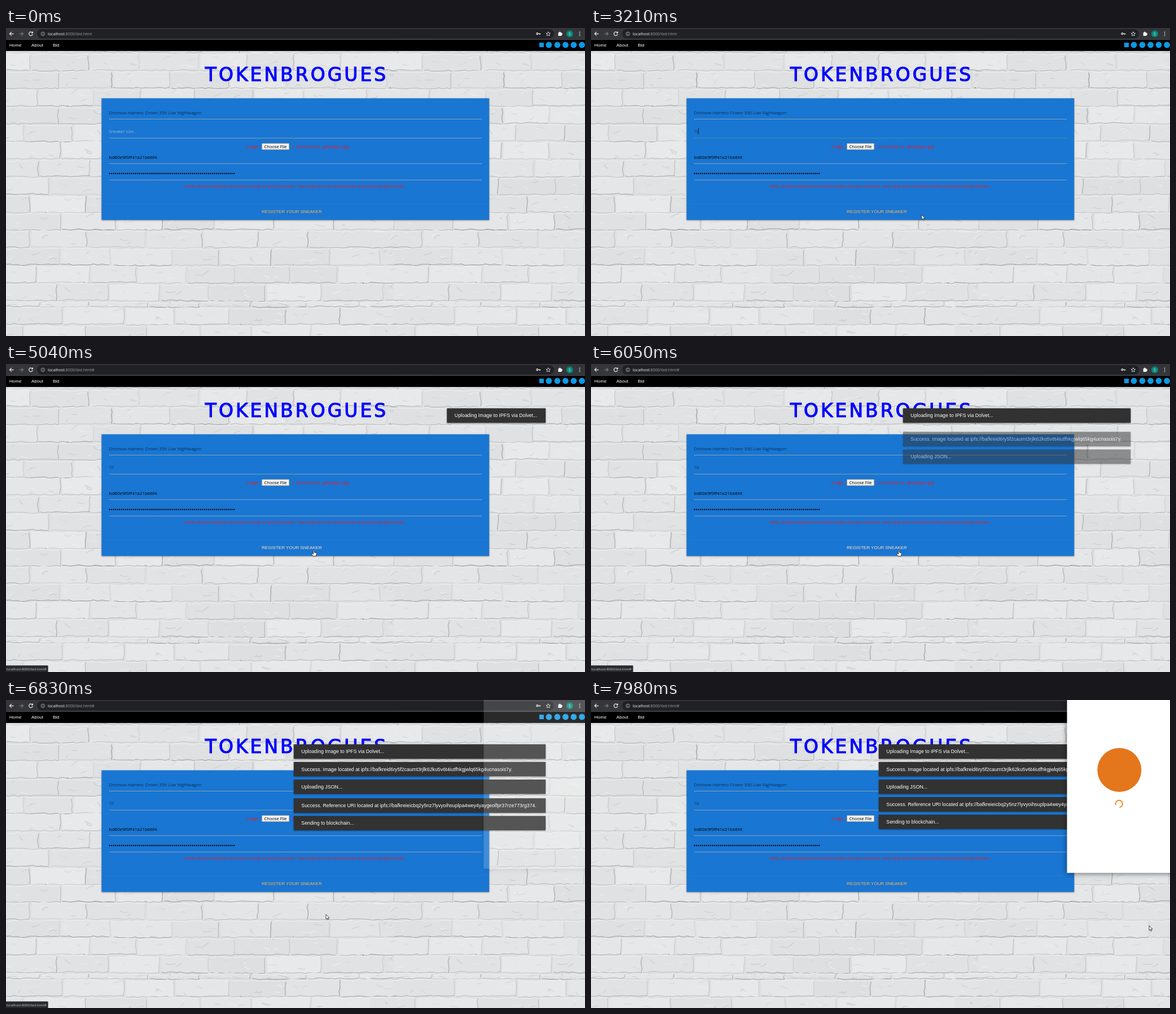
An HTML page for the animation above (8 s loop, 1026 by 546 pixels).

```html
<!DOCTYPE html>
<html lang="en">
<head>
<meta charset="utf-8">
<title>Sneaker registration</title>
<style>
  html, body { margin: 0; width: 100%; height: 100%; overflow: hidden; background: #dcdedf; }
  svg { display: block; width: 100vw; height: 100vh; }
  text { white-space: pre; }
  .page { font-family: "Open Sans", "Noto Sans", sans-serif; }
  .ui { font-family: "Liberation Sans", Arial, sans-serif; }
  .title { font-family: "DejaVu Sans", sans-serif; letter-spacing: 4px; }
  .raised { filter: drop-shadow(0 1px 1.2px rgba(0, 0, 0, .4)); }
  .window { filter: drop-shadow(0 1px 5px rgba(0, 0, 0, .55)); }
</style>
</head>
<body>
<svg id="stage" viewBox="0 0 1026 546" preserveAspectRatio="none"></svg>
<script>
const LOOP = 8000;
const stage = document.getElementById('stage');

function add(parent, tag, attrs = {}, content) {
  const el = document.createElementNS('http://www.w3.org/2000/svg', tag);
  set(el, attrs);
  if (content !== undefined) el.textContent = content;
  parent.appendChild(el);
  return el;
}
function set(el, attrs) {
  for (const key in attrs) el.setAttribute(key, attrs[key]);
}
const rect = (p, x, y, width, height, fill, more) => add(p, 'rect', { x, y, width, height, fill, ...more });
const circle = (p, cx, cy, r, fill, more) => add(p, 'circle', { cx, cy, r, fill, ...more });
const path = (p, d, more) => add(p, 'path', { d, fill: 'none', ...more });
const label = (p, x, y, str, size, fill, more) =>
  add(p, 'text', { x, y, 'font-size': size, fill, class: 'page', ...more }, str);
const show = (el, on) => el.setAttribute('visibility', on ? 'visible' : 'hidden');

const clamp = v => Math.max(0, Math.min(1, v));
const ramp = (t, from, to) => clamp((t - from) / (to - from));
const lerp = (a, b, p) => a + (b - a) * p;
const easeOut = p => 1 - (1 - p) ** 3;
const mix = (a, b, p) => `rgb(${a.map((v, i) => Math.round(lerp(v, b[i], p)))})`;

// Seeded random numbers for the wall
let seed = 41;
function rnd(lo = 0, hi = 1) {
  seed = (seed * 16807) % 2147483647;
  return lo + (hi - lo) * seed / 2147483647;
}

function jagged(x1, y1, x2, y2, wobble) {
  const n = Math.max(2, Math.round(Math.hypot(x2 - x1, y2 - y1) / 7));
  let d = '';
  for (let i = 0; i <= n; i++) {
    const x = lerp(x1, x2, i / n) + rnd(-wobble, wobble);
    const y = lerp(y1, y2, i / n) + rnd(-wobble, wobble);
    d += `${i ? 'L' : ''}${x.toFixed(1)} ${y.toFixed(1)} `;
  }
  return d;
}

function brick(p, x, y, w, h) {
  const g = Math.round(rnd(221, 231));
  const right = x + w - 3, bottom = y + h - 3;
  const top = jagged(x, y, right, y, 1.3);
  const side = jagged(right, y + 1, right, bottom, 1.3);
  const under = jagged(right, bottom, x, bottom, 1.3);
  const shadow = () => ({ stroke: '#96999b', 'stroke-width': rnd(.4, 1.4), opacity: rnd(.35, .9) });
  path(p, `M${top}L${side}L${under}Z`, { fill: `rgb(${g},${g + 2},${g + 3})` });
  path(p, `M${side}`, shadow());
  path(p, `M${under}`, shadow());
  path(p, `M${top}`, { stroke: '#f1f2f2', 'stroke-width': 1 });
  for (let i = 0; i < 4; i++) {
    const sx = rnd(x + 4, right - 14), sy = rnd(y + 4, bottom - 4);
    path(p, 'M' + jagged(sx, sy, sx + rnd(4, 16), sy + rnd(-6, 6), 1.8),
      { stroke: i % 2 ? '#eff0f1' : '#c6c9cb', 'stroke-width': rnd(.5, 1.5), opacity: .75 });
  }
  if (rnd() < .25) circle(p, rnd(x, right), bottom, rnd(.4, .9), '#77797b');
}

function buildWall() {
  const tile = add(stage, 'g', { id: 'tile' });
  rect(tile, 0, 40, 695, 506, '#dddfe0');
  let y = 15, row = 0;
  while (y < 546) {
    const h = row === 15 ? 11 : 31.4;
    let x = row % 2 ? -50 : -8;
    while (x < 695) {
      const w = Math.min(rnd(82, 112), 698 - x);
      if (w > 12) brick(tile, x, y + rnd(-1, 1), w, h);
      x += w;
    }
    y += h;
    row++;
  }
  add(stage, 'use', { href: '#tile', x: 695 });
}

function buildBrowser() {
  rect(stage, 0, 0, 1026, 20.5, '#35363a');
  rect(stage, 55, 2, 916, 16.5, '#202124', { rx: 8.2 });
  const pen = { stroke: '#e8eaed', 'stroke-width': 1.2 };
  path(stage, 'M13.5 10.3H6.5M9.8 7L6.5 10.3L9.8 13.6', pen);
  path(stage, 'M23.5 10.3H30.5M27.2 7L30.5 10.3L27.2 13.6', { ...pen, stroke: '#76787b' });
  path(stage, 'M46.6 8.2A3.3 3.3 0 1 0 47.2 11M47.4 6.3V9H44.7', pen);
  circle(stage, 65.3, 10.3, 3.2, 'none', { stroke: '#c4c7ca', 'stroke-width': .8 });
  path(stage, 'M65.3 9.8V12M65.3 8.3V9.1', { stroke: '#c4c7ca', 'stroke-width': .8 });
  const url = label(stage, 74, 12.8, '', 7.1, '#9aa0a6');
  add(url, 'tspan', { fill: '#f1f3f4' }, 'localhost');
  add(url, 'tspan', {}, ':8000/bid.html');
  const hash = add(url, 'tspan', {}, '');

  circle(stage, 941.4, 10.2, 1.5, 'none', pen);
  path(stage, 'M943 10.2H947.3M945.8 10.2V12', pen);
  const star = Array.from({ length: 10 }, (_, i) => {
    const r = i % 2 ? 1.8 : 4, a = i * Math.PI / 5;
    return `${960.8 + r * Math.sin(a)},${10.6 - r * Math.cos(a)}`;
  });
  add(stage, 'polygon', { points: star.join(' '), fill: 'none', stroke: '#dfe1e5', 'stroke-width': .9 });
  rect(stage, 978.6, 8, 6, 6, '#f1f3f4', { rx: .6 });
  circle(stage, 981.4, 7.9, 1.3, '#f1f3f4');
  circle(stage, 984.8, 10.8, 1.3, '#f1f3f4');
  circle(stage, 999, 10.2, 6, '#00897b');
  label(stage, 999, 12.8, 'S', 7, '#fff', { 'text-anchor': 'middle' });
  for (const y of [7.3, 10.3, 13.3]) circle(stage, 1016.5, y, .9, '#e8eaed');
  return hash;
}

function buildPage() {
  rect(stage, 0, 20.5, 1026, 20.3, '#000');
  [['Home', 6], ['About', 45], ['Bid', 83]].forEach(([s, x]) =>
    label(stage, x, 33.2, s, 8, '#fff', { class: 'ui' }));
  rect(stage, 945, 26, 8, 8, '#0d99e6');
  for (const x of [962, 977, 991.5, 1006, 1020.5]) circle(stage, x, 30, 5.4, '#0d99e6');
  label(stage, 515, 94, 'TOKENBROGUES', 33, '#00f',
    { class: 'title', 'text-anchor': 'middle', stroke: '#00f', 'stroke-width': 1.1 });

  rect(stage, 169.4, 124.6, 686.8, 215.6, '#1976d2', { class: 'raised' });
  const lines = [161.5, 195.2, 240.5, 269.5].map(y =>
    path(stage, `M182.5 ${y}H843.5`, { stroke: '#91a5ba', 'stroke-width': .9 }));
  const light = { 'font-weight': 300 };
  label(stage, 182.5, 152.8, 'Dromow Hammo Crown 350 Low Nightwagon', 8, '#020b14', light);
  const hint = label(stage, 182.5, 186.1, 'Sneaker size...', 7.8, '#d1d9e1', light);
  const size = label(stage, 182.5, 186.1, '', 7.4, '#020b14', light);
  const caret = rect(stage, 182.3, 177.3, .8, 11.2, '#06121f');

  const red = '#ff1020';
  label(stage, 426, 213.2, 'Image:', 7.4, red);
  rect(stage, 453.3, 204.4, 48.6, 11.4, '#efefef', { stroke: '#767676', 'stroke-width': .7, rx: .8 });
  label(stage, 477.6, 212.9, 'Choose File', 7.5, '#000', { 'text-anchor': 'middle' });
  label(stage, 506, 213.2, '1. Dromow Ha...ghtwagon.jpg', 7.4, red);
  label(stage, 182.5, 231.6, 'bd60e9f0ff41e21bb6f4', 8, '#000');
  path(stage, 'M183.6 258H404.6', { stroke: '#000', 'stroke-width': 2.3,
    'stroke-linecap': 'round', 'stroke-dasharray': '0 3.5' });
  label(stage, 512, 282.8, 'Note: Dolvet requests are done locally via your browser. ' +
    'Your keys are not shared with any party except Dolvet.', 7.6, red, { 'text-anchor': 'middle' });
  path(stage, 'M169.5 311H856.5', { stroke: '#a0a0a0', 'stroke-width': .6, opacity: .2 });
  const register = label(stage, 453, 328.1, 'REGISTER YOUR SNEAKER', 8.02, '#ffab40', { class: 'ui' });

  const status = add(stage, 'g');
  rect(status, -1, 534.5, 75.5, 13, '#292a2d', { stroke: '#5f6368', 'stroke-width': .7, rx: 1 });
  label(status, .8, 542.8, 'localhost:8000/bid.html#', 6.1, '#c8cbcf');
  return { line: lines[1], hint, size, caret, register, status };
}

const TOASTS = [
  [4760, 'Uploading Image to IPFS via Dolvet...'],
  [5998, 'Success. Image located at ipfs://bafkreid6ry5f2caumt3rjlk62ku5v6t4iutfhkgjwlq65kg4ucnasois7y.'],
  [5998, 'Uploading JSON...'],
  [6677, 'Success. Reference URI located at ipfs://bafkreieicbq2y5nz7lyvyoihsuplpa4wey4yaygeolfpr37rze773rg374.'],
  [6677, 'Sending to blockchain...']
];

function buildToasts() {
  return TOASTS.map(([start, str], i) => {
    const g = add(stage, 'g');
    const box = rect(g, 0, 0, 10, 25.6, '#323232', { class: 'raised', rx: .8 });
    label(g, 13.5, 15.9, str, 8.8, '#fff', { class: 'ui' });
    return { start, g, box, y: 78.6 + i * 31.15 };
  });
}

function buildWallet() {
  const g = add(stage, 'g', { class: 'window' });
  const box = rect(g, 843.5, -10, 190, 316.5, '#fff');
  const badge = circle(g, 936.3, 124, 39, '#e4761b');
  const spinner = circle(g, 935.8, 184, 6.2, 'none', {
    stroke: '#f6851b', 'stroke-width': 1.9, 'stroke-dasharray': '30 9' });
  return { g, box, badge, spinner };
}

function buildPointers() {
  const ink = { fill: '#fff', stroke: '#000', 'stroke-width': .7, 'stroke-linejoin': 'round' };
  return {
    arrow: path(stage, 'M0 0V8.6L2 6.8L3.3 9.8L4.6 9.2L3.3 6.3H6Z', ink),
    beam: path(stage, 'M-2 -5.5H2M0 -5.5V5.5M-2 5.5H2', { stroke: '#4b5a62', 'stroke-width': .8 }),
    hand: path(stage, 'M-.9 -.5Q0 -2 .9 -.5V3L4 3.8Q5 4.2 4.8 5.5L4 9.6H-1.6L-4 6Q-4.3 4.6 -3 4.8L-.9 6.2Z', ink)
  };
}

buildWall();
const hash = buildBrowser();
const page = buildPage();
const toasts = buildToasts();
const wallet = buildWallet();
const pointers = buildPointers();

// Moments at which the screen refreshes: first, last, count
const BEATS = [
  [230, 1000, 11], [1070, 1280, 4], [1540, 1540, 1], [1900, 1990, 2], [2570, 2650, 2],
  [2880, 3660, 11], [3840, 4160, 5], [4570, 4640, 2], [4810, 5040, 4], [6050, 6280, 4],
  [6600, 7360, 11], [7470, 7980, 8]
];
function refreshTime(t) {
  let last = 0;
  for (const [a, b, n] of BEATS) {
    for (let i = 0; i < n; i++) {
      const s = Math.round(n > 1 ? lerp(a, b, i / (n - 1)) : a);
      if (s <= t) last = s;
    }
  }
  return last;
}

const ROUTE = [
  [230, 616, 511], [1000, 216, 181], [2650, 218, 181], [2800, 219, 182], [3190, 586, 331],
  [3660, 552, 333], [3840, 548, 332], [4160, 545.5, 331], [6600, 545.5, 331],
  [6828, 567, 380], [7360, 598, 414], [7620, 760, 417], [7980, 989, 400]
];
function pointerAt(t) {
  let i = 0;
  while (i < ROUTE.length - 2 && t >= ROUTE[i + 1][0]) i++;
  const [t1, x1, y1] = ROUTE[i], [t2, x2, y2] = ROUTE[i + 1];
  const p = ramp(t, t1, t2);
  return [lerp(x1, x2, p), lerp(y1, y2, p)];
}

const within = (t, a, b) => t >= a && t < b;
const CARET_ON = [[1000, 1540], [1900, 2570], [3040, 3560], [4080, 4570]];

function drawForm(t) {
  const typed = t >= 1990 ? '10' : t >= 1900 ? '1' : '';
  page.size.textContent = typed;
  show(page.hint, !typed);
  page.caret.setAttribute('x', 182.3 + typed.length * 3.9);
  show(page.caret, CARET_ON.some(([a, b]) => within(t, a, b)));
  const focus = ramp(t, 1000, 1280) - ramp(t, 4520, 4820);
  page.line.setAttribute('stroke', mix([145, 165, 186], [62, 160, 162], focus));
  const hover = ramp(t, 3790, 4090) - ramp(t, 6600, 6800);
  page.register.setAttribute('fill', mix([255, 178, 84], [255, 224, 188], hover));
  page.status.setAttribute('opacity', ramp(t, 3900, 4100) - ramp(t, 6900, 7100));
  hash.textContent = t >= 4810 ? '#' : '';
}

function drawToasts(t) {
  const left = t < 5998 ? 781.3 : t < 6677 ? 552.8 : 509.8;
  for (const { start, g, box, y } of toasts) {
    const p = easeOut(ramp(t, start, start + 300));
    set(g, { transform: `translate(${left} ${y + 18.7 * (1 - p)})`, opacity: clamp(p * 1.15) });
    box.setAttribute('width', 956.3 - left);
  }
}

function drawWallet(t) {
  const p = ramp(t, 6790, 7020);
  set(wallet.g, { opacity: p });
  set(wallet.box, { x: 843.5 + 3.6 * (1 - p), height: 316.5 - 9 * (1 - p) });
  show(wallet.badge, t >= 7200);
  show(wallet.spinner, t >= 7360);
  wallet.spinner.setAttribute('transform', `rotate(${(t - 7980) * .36 + 160} 935.8 184)`);
}

function drawPointer(t) {
  const [x, y] = pointerAt(t);
  const inField = within(x, 182, 843) && within(y, 172, 196);
  const kind = inField ? 'beam' : within(t, 3840, 6670) ? 'hand' : 'arrow';
  const visible = t >= 230 && !within(t, 1900, 2650);
  for (const name in pointers) {
    show(pointers[name], visible && name === kind);
    pointers[name].setAttribute('transform', `translate(${x} ${y})`);
  }
}

function render(now) {
  const t = refreshTime(now % LOOP);
  drawForm(t);
  drawToasts(t);
  drawWallet(t);
  drawPointer(t);
}

function tick() {
  render(performance.now());
  requestAnimationFrame(tick);
}
tick();
</script>
</body>
</html>
```
